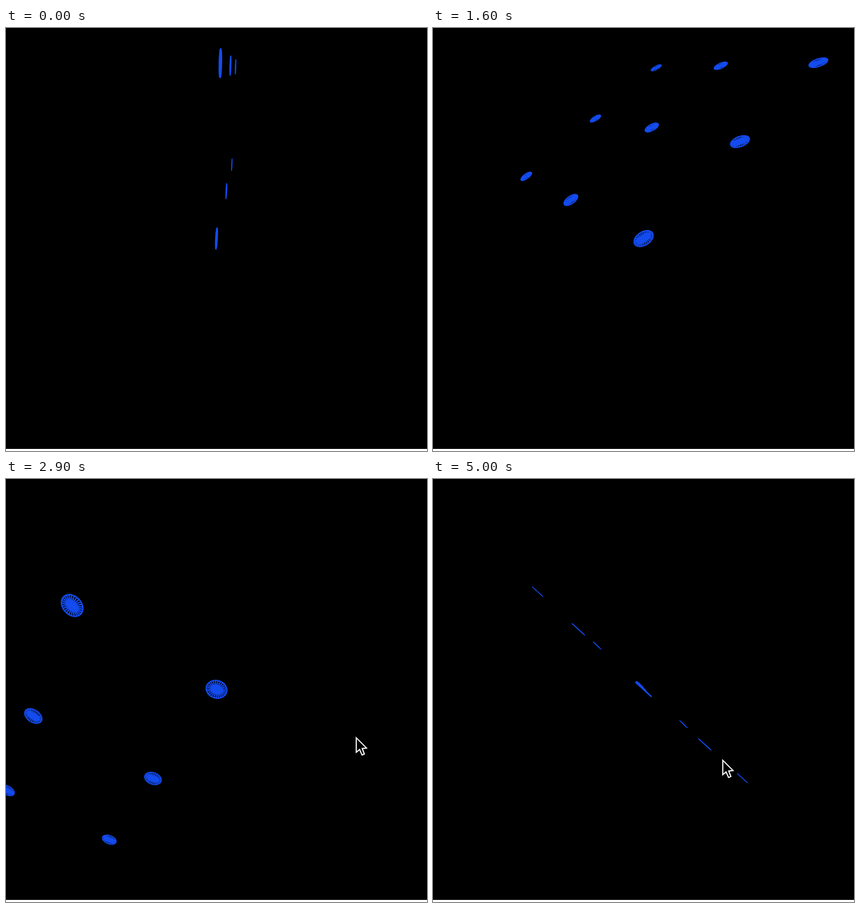
Animation, 600 px wide and 603 px high, one loop 5.1 s. Source, as an HTML page with a canvas:

```html
<!DOCTYPE html>
<html lang="en">
<head>
<meta charset="utf-8">
<title>Tumbling grid of discs</title>
<style>
  html, body { margin: 0; width: 100%; height: 100%; overflow: hidden; background: #fff; }
  canvas { display: block; }
</style>
</head>
<body>
<canvas id="stage" width="600" height="600"></canvas>
<script>
const ctx = document.getElementById('stage').getContext('2d');
const LOOP = 5100, STEP = 100, END = 5;
const SIZE = 600, MID = SIZE / 2, DEPTH = MID / Math.tan(Math.PI / 6);
const COUNT = 3, GAP = 225, RADIUS = 15, SIDES = 25, LINE = 1.8;
const BLUE = '#134bee';
const { sin, cos, PI } = Math;

// Steady turning that coasts to a stop over the last stretch.
const BRAKE = 3.47, COAST = 0.406;
function spin(t) {
  if (t < BRAKE) return t;
  return BRAKE + COAST * sin(PI / 2 * (t - BRAKE) / (END - BRAKE));
}

// Where the pointer comes to rest or turns round, in seconds and pixels.
const STOPS = [
  { t: 2, x: 208, y: 513 },
  { t: 2.1, x: 217, y: 400 },
  { t: 3, x: 508, y: 368 },
  { t: 3.6, x: 502, y: 376 },
  { t: 4.25, x: 86, y: 402 },
  { t: 4.9, x: 432, y: 420 },
  { t: END, x: 413, y: 401 }
];

function pointerAt(t) {
  const next = Math.max(1, STOPS.findIndex(s => s.t >= t));
  const a = STOPS[next - 1], b = STOPS[next];
  const k = (1 - cos(PI * (t - a.t) / (b.t - a.t))) / 2;
  return [a.x + (b.x - a.x) * k, a.y + (b.y - a.y) * k];
}

// The grid's two axes after turning about z, then y, then x.
function axes(t) {
  const [a, b, c] = [142 - 60 * t, 150.3 * t - 84.9, 346.8 - 78.2 * t].map(d => d * PI / 180);
  const turn = (x, y) => {
    const z = -x * sin(b);
    return [x * cos(b), y * cos(a) - z * sin(a), y * sin(a) + z * cos(a)];
  };
  return [turn(cos(c), sin(c)), turn(-sin(c), cos(c))];
}

function project([u, v], x, y) {
  const scale = DEPTH / (DEPTH - x * u[2] - y * v[2]);
  return [
    MID + (x * u[0] + y * v[0]) * scale,
    MID + (x * u[1] + y * v[1]) * scale,
    scale
  ];
}

function drawDisc(grid, x, y) {
  const [cx, cy, scale] = project(grid, x, y);
  if (scale <= 0) return;
  const rim = Array.from({ length: SIDES }, (_, i) => {
    const a = i / SIDES * PI * 2;
    return project(grid, x + RADIUS * cos(a), y + RADIUS * sin(a));
  });
  ctx.beginPath();
  for (const [px, py] of rim) ctx.lineTo(px, py);
  ctx.closePath();
  for (const [px, py] of rim) {
    ctx.moveTo(cx, cy);
    ctx.lineTo(px, py);
  }
  ctx.lineWidth = LINE * scale;
  ctx.lineJoin = 'round';
  ctx.strokeStyle = BLUE;
  ctx.stroke();
}

// One half of the arrow, mirrored about its axis.
const HALF = [[7.9, 19], [2, 17.2], [1.8, 25.8]];
const ARROW = [[0, 0], ...HALF, ...HALF.map(([x, y]) => [-x, y]).reverse()];

function drawPointer(x, y) {
  ctx.save();
  ctx.translate(x, y);
  ctx.rotate(-PI / 8);
  ctx.beginPath();
  for (const [px, py] of ARROW) ctx.lineTo(px, py);
  ctx.closePath();
  ctx.fillStyle = '#000';
  ctx.fill();
  ctx.lineWidth = 1.6;
  ctx.lineJoin = 'miter';
  ctx.strokeStyle = '#fff';
  ctx.stroke();
  ctx.restore();
}

function draw(t) {
  ctx.fillStyle = '#000';
  ctx.fillRect(0, 0, SIZE, SIZE);
  const grid = axes(spin(t));
  for (let i = 0; i < COUNT; i++)
    for (let j = 0; j < COUNT; j++) drawDisc(grid, i * GAP, j * GAP);
  if (t >= STOPS[0].t) drawPointer(...pointerAt(t));
}

const start = performance.now();
function tick() {
  const ms = Math.max(0, performance.now() - start) % LOOP;
  draw(Math.floor(ms / STEP) * STEP / 1000);
  requestAnimationFrame(tick);
}
tick();
</script>
</body>
</html>
```
